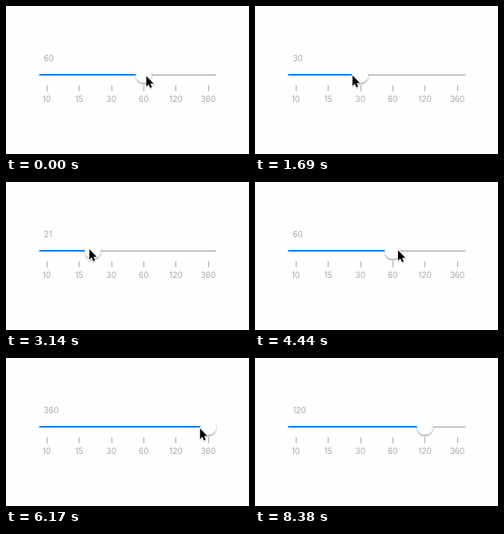
An HTML page for the animation above (8680 ms loop, 304 by 185 pixels).

```html
<!DOCTYPE html>
<html lang="en">
<head>
<meta charset="utf-8">
<title>Sticky slider</title>
<style>
  html, body { margin: 0; width: 100%; height: 100%; overflow: hidden; background: #fefefe; }
  svg { display: block; width: 304px; height: 185px; }
  text { font: 10px Inter, "Liberation Sans", sans-serif; fill: #a9a9a9; }
</style>
</head>
<body>
<svg viewBox="0 0 304 185" xmlns="http://www.w3.org/2000/svg">
  <defs>
    <filter id="shadow" x="-50%" y="-50%" width="200%" height="200%">
      <feDropShadow dx="0" dy="1.7" stdDeviation="1.3" flood-color="#000" flood-opacity=".38"/>
    </filter>
    <filter id="soft" x="-50%" y="-50%" width="200%" height="200%">
      <feDropShadow dx="0" dy=".8" stdDeviation=".7" flood-color="#000" flood-opacity=".3"/>
    </filter>
  </defs>
  <text id="value" x="47.3" y="69.3"></text>
  <g id="scale"></g>
  <path id="rest" stroke="#b3b1b3" stroke-width="1.5"/>
  <path id="fill" stroke="#0a7dff" stroke-width="2"/>
  <circle id="thumb" cy="86" r="10" fill="#fff" filter="url(#shadow)"/>
  <g id="cursor" filter="url(#soft)">
    <path d="M.7 1.2V14.4L3.6 11.6L5.6 16.2L7.8 15.2L5.9 10.7H9.9Z"
          fill="#000" stroke="#fff" stroke-width="1.6" paint-order="stroke"/>
  </g>
</svg>
<script>
const LOOP = 8680, TICK = 58;
const REGRAB = 2500, RELEASE = 7300;
const STOPS = [10, 15, 30, 60, 120, 360];
const FIRST = 51, GAP = 40.4, MAGNET = 12.7, GRIP = 5;

// Pointer strokes: start, end, x, y; the pointer rests in any gap between them
const HOME = [174.8, 86.3];
const STROKES = [
  [0, 116, 171.5, 87.3],
  [352, 1230, 145, 87.8],
  [1230, 1680, 121.3, 85.6],
  [1680, 2100, 109, 86],
  [2100, 2490, 86, 84.5],
  [2740, 3130, 103.5, 82.7],
  [3130, 4410, 178.3, 84],
  [4410, 5450, 219.3, 86],
  [5450, 6700, 260, 87.5],
  [6700, 6900, 257.3, 87.7],
  [6900, 7480, 213.8, 89.8],
  [7900, 8350, 264, 190]
];

const $ = id => document.getElementById(id);
const stopX = i => FIRST + GAP * i;
const clamp = (v, a, b) => Math.min(b, Math.max(a, v));

function pointer(t) {
  let [x, y] = HOME;
  for (const [start, end, toX, toY] of STROKES) {
    const k = clamp((t - start) / (end - start), 0, 1);
    x += (toX - x) * k;
    y += (toY - y) * k;
  }
  return [x, y];
}

// The thumb sticks near each stop and settles on the nearest one when released
function thumbX(t) {
  const [x] = pointer(Math.min(t, RELEASE));
  const raw = clamp(x + (t > REGRAB ? GRIP : 0), stopX(0), stopX(5));
  const near = stopX(Math.round((raw - FIRST) / GAP));
  return t >= RELEASE || Math.abs(raw - near) < MAGNET ? near : raw;
}

function valueAt(x) {
  const p = (x - FIRST) / GAP;
  const i = Math.min(4, Math.floor(p + 1e-6));
  return Math.floor(STOPS[i] + (STOPS[i + 1] - STOPS[i]) * (p - i) + 1e-4);
}

function draw(time) {
  const t = Math.floor(time / TICK) * TICK;
  const tx = thumbX(t);
  $("value").textContent = valueAt(tx);
  $("fill").setAttribute("d", `M41.5 86H${tx}`);
  $("rest").setAttribute("d", `M${tx} 86.2H263`);
  $("thumb").setAttribute("cx", tx);
  $("cursor").setAttribute("transform", `translate(${pointer(t)})`);
}

$("scale").innerHTML = STOPS.map((n, i) => {
  const x = stopX(i);
  return `<path d="M${Math.floor(x + 0.3) + 0.5} 99V106.5" stroke="#aaa"/>` +
    `<text x="${x}" y="119.7" text-anchor="middle">${n}</text>`;
}).join("");

const began = performance.now();
function frame() {
  draw((performance.now() - began) % LOOP);
  requestAnimationFrame(frame);
}
frame();
</script>
</body>
</html>
```
